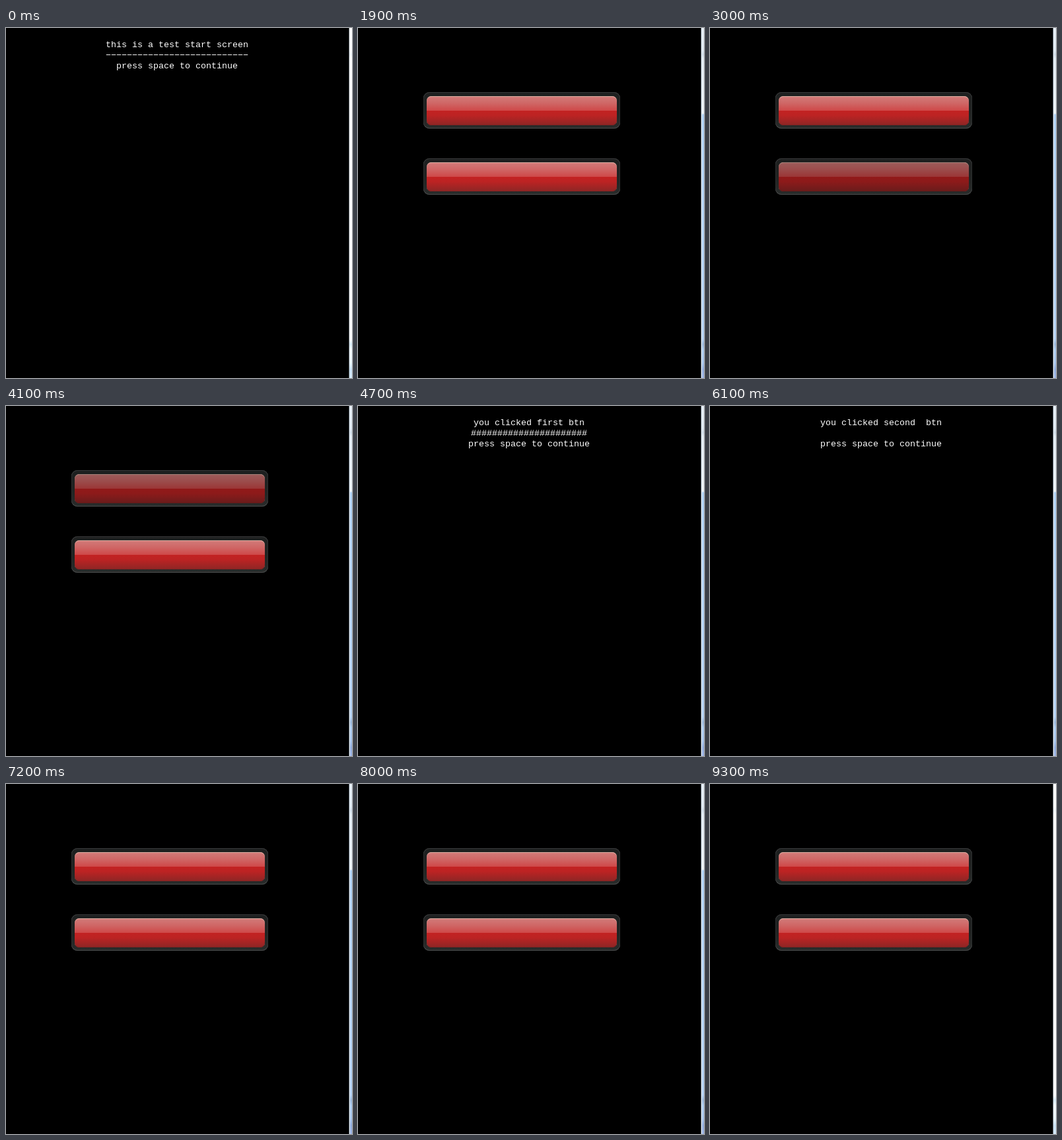
These frames come from a looping animation (524 px wide and 529 px high, 9.4 s). An HTML page:

```html
<!DOCTYPE html>
<html lang="en">
<head>
<meta charset="utf-8">
<title>Button test</title>
<style>
  html, body { margin: 0; width: 100%; height: 100%; overflow: hidden; background: #000; }
  #stage { position: relative; width: 524px; height: 529px; overflow: hidden; background: #000; }
  #stage > * { position: absolute; }

  .edge { left: 519px; top: 0; width: 5px; height: 529px; box-sizing: border-box; }
  .blue {
    border-left: 1px solid #4f5962;
    box-shadow: inset 1px 0 #eef5fb;
    background: linear-gradient(#e6eef5, #dfe9f2 34px, #cfdce8 40px, #e2ebf3 46px, #edf3f8 129px,
      #b0d2f5 131px, #b6d5f6 300px, #b5d2f4 470px, #9cb8da 478px, #aecdf0 486px,
      #a9c6ec 506px, #93aede 516px, #9fb6e6);
  }
  .white {
    border-left: 1px solid #5f666b;
    background: linear-gradient(#fff, #fdfeff 34px, #f0f6fb 40px, #fff 46px, #fff 470px,
      #d8ebf7 478px, #f4fbff 486px, #ebf6fd 506px, #cae2f6 516px, #d4e9f8);
  }

  .text { left: 0; top: 0; }
  .text text {
    font: 13.3333px "Liberation Mono", "Courier New", monospace;
    fill: #fff; text-anchor: middle; white-space: pre;
  }

  #menu { left: 99px; top: 97px; }
  .btn {
    position: absolute; left: 0; width: 298px; height: 55px; border-radius: 9px;
    background: linear-gradient(#1d1f1f, #202322 50%, #292c2b);
    box-shadow: inset 0 1px #3a3b3c, inset 0 -1px #4b4d4d, inset 1px 0 #2e3030, inset -1px 0 #2e3030;
  }
  .face, .shade { position: absolute; left: 5px; top: 6px; width: 288px; height: 44px; border-radius: 7px; }
  .face {
    background: linear-gradient(#d27c7a, #cf6665 11px, #cf4848 22px, #c22222 22px, #bd2323 29px, #8d2625);
    box-shadow: inset 0 1px #dcaea2, inset 0 -1px #832322;
  }
  .shade { background: #000; }
</style>
</head>
<body>
<div id="stage">
  <div class="edge white"></div>
  <div class="edge blue" id="blue"></div>
  <div id="menu"></div>
</div>
<script>
  const LOOP = 9400;
  const stage = document.getElementById('stage');
  const menu = document.getElementById('menu');

  // Every listed time flips the element; it starts hidden unless `visible`.
  function toggle(el, times, { on = 1, visible = false } = {}) {
    const frames = [0, ...times, LOOP].map((t, i) => ({
      offset: t / LOOP,
      opacity: (i % 2 === 1) !== visible ? on : 0,
      easing: 'step-end'
    }));
    el.style.opacity = frames[0].opacity;
    el.animate(frames, { duration: LOOP, iterations: Infinity, fill: 'both' });
  }

  function addText(lines, times, options) {
    const body = lines.map((s, i) => `<text x="259" y="${29 + 16 * i}">${s}</text>`).join('');
    stage.insertAdjacentHTML('beforeend',
      `<svg class="text" width="519" height="80">${body}</svg>`);
    toggle(stage.lastElementChild, times, options);
  }

  function addButton(top, hovers) {
    menu.insertAdjacentHTML('beforeend',
      `<div class="btn" style="top:${top}px"><div class="face"></div><div class="shade"></div></div>`);
    toggle(menu.lastElementChild.lastElementChild, hovers, { on: 0.25 });
  }

  const prompt = 'press space to continue';
  addText(['this is a test start screen', '\u2212'.repeat(27), prompt], [1900], { visible: true });
  addText(['you clicked first btn', '#'.repeat(22), prompt], [4700, 5500]);
  addText(['you clicked second  btn', '', prompt], [6100, 6600]);

  addButton(0, [2500, 2900, 3500, 3800, 4100, 4200, 4300, 4700, 8400, 8600]);
  addButton(100, [3000, 3500, 3800, 4100, 4200, 4300, 5800, 6100,
    7000, 7200, 7400, 7600, 7900, 8000, 8600, 8800]);

  toggle(menu, [1900, 4700, 5500, 6100, 6600]);
  toggle(document.getElementById('blue'), [500, 9300]);
</script>
</body>
</html>
```
